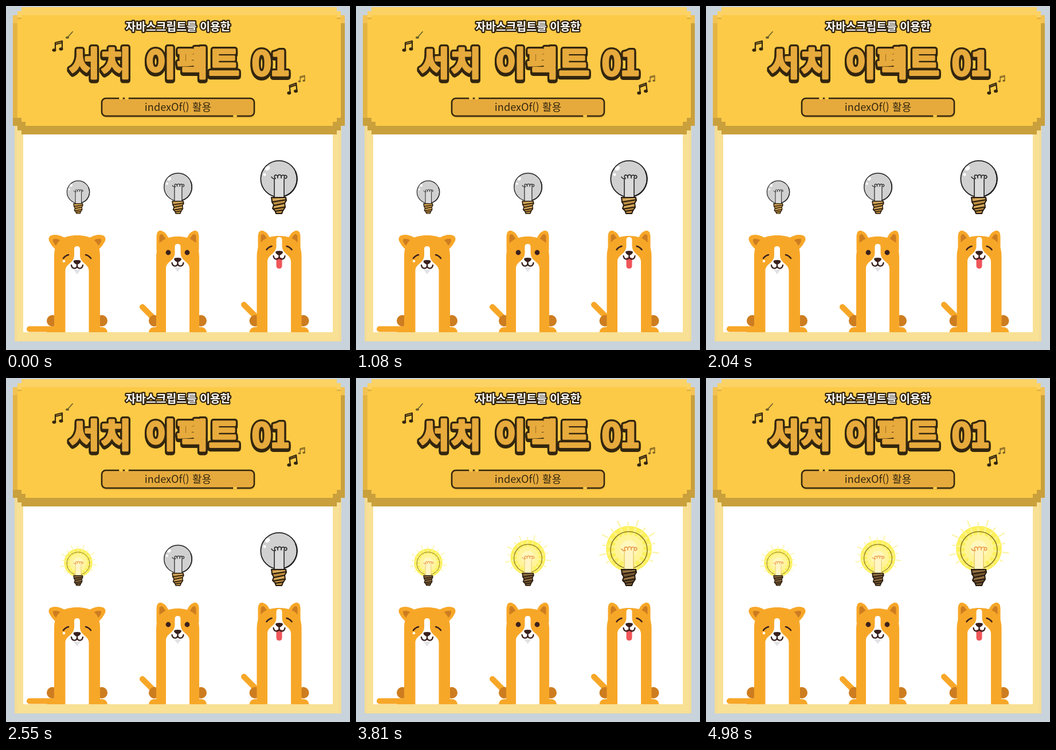
These frames come from a looping animation (600 by 600 pixels, 5.01 s). An HTML page:

```html
<!DOCTYPE html>
<html lang="ko">
<head>
<meta charset="utf-8">
<style>
html, body { margin: 0; width: 100%; height: 100%; overflow: hidden; background: #c9d3dc; }
svg { display: block; width: 600px; height: 600px; }
text { font-family: "Noto Sans CJK KR", "Noto Sans CJK", sans-serif; text-anchor: middle; paint-order: stroke; stroke-linejoin: round; }
.title { font-size: 58px; font-weight: 900; letter-spacing: 2px; }
</style>
</head>
<body>
<svg id="stage" viewBox="0 0 600 600"></svg>
<script>
const LOOP = 5010, STEP = 30;
const INK = '#33260f', ORANGE = '#f7a728', BROWN = '#cd7d20', FACE = '#3a211d';

const rect = (x, y, w, h, fill, more = '') =>
  `<rect x="${x}" y="${y}" width="${w}" height="${h}" fill="${fill}" ${more}/>`;
const path = (d, fill, more = '') => `<path d="${d}" fill="${fill}" ${more}/>`;
const line = (d, color, width, more = '') =>
  `<path d="${d}" fill="none" stroke="${color}" stroke-width="${width}" stroke-linecap="round" stroke-linejoin="round" ${more}/>`;
const circle = (x, y, r, fill, more = '') => `<circle cx="${x}" cy="${y}" r="${r}" fill="${fill}" ${more}/>`;
const group = (transform, body, more = '') => `<g transform="${transform}" ${more}>${body}</g>`;

function frame() {
  return rect(0, 0, 600, 600, '#c9d3dc') +
    rect(15, 200, 570, 385, '#f8e094') +
    rect(15, 200, 4, 385, '#f3dc98') + rect(581, 200, 4, 385, '#f3dc98') +
    rect(30, 222, 540, 347, '#fff') +
    path('M27 2H577V9H584V16H591V209H584V217H577V224H27V217H20V209H12V16H20V9H27Z', '#c9a03c') +
    path('M27 2H577V9H584V195H577V202H570V209H34V202H27V195H12V16H20V9H27Z', '#e4b443') +
    path('M27 2H577V9H584V20H12V16H20V9H27Z', '#fcd264') +
    path('M27 16H577V23H584V195H577V202H570V209H34V202H27V195H20V23H27Z', '#fdca47') +
    path('M584 16H591V30H584Z M12 16H20V30H12Z', '#f2c254');
}

function notes() {
  const pair = line('M-6 6V-6L6 -9V4M-6 -3L6 -6', INK, 2.2) +
    '<ellipse cx="-8" cy="7" rx="3.5" ry="2.7"/><ellipse cx="4" cy="5" rx="3.5" ry="2.7"/>';
  return group('translate(92 70)', pair, `fill="${INK}"`) +
    group('translate(501 144) rotate(-6)', pair, `fill="${INK}"`) +
    group('translate(517 127) scale(.65)', pair, `fill="${INK}" opacity=".65"`) +
    line('M108 54L116 45', '#6d6127', 1.8) +
    '<ellipse cx="107" cy="55" rx="3" ry="2" fill="#6d6127"/>';
}

function heading() {
  const words = (dy, color, width) =>
    `<g class="title" fill="${color}" stroke="${color}" stroke-width="${width}">` +
    `<text x="165" y="${121 + dy}">서치</text><text x="326" y="${121 + dy}">이펙트</text>` +
    `<text x="461" y="${121 + dy}" letter-spacing="-2">01</text></g>`;
  return `<text x="300" y="43" font-size="19.3" font-weight="700" fill="#fff" stroke="${INK}" stroke-width="4.5">자바스크립트를 이용한</text>` +
    words(3, INK, 10) + words(0, INK, 10) + words(0, '#e7aa3c', 3.5) +
    rect(167, 163, 267, 32, '#c99a36', 'rx="7" opacity=".5"') +
    rect(167, 161, 266, 31, '#e6aa3c', `rx="7" stroke="${INK}" stroke-width="2.6"`) +
    line('M199 161H202M209 161H212M398 192H401', '#fdca47', 4) +
    `<text x="300" y="183" font-size="18.2" font-weight="500" fill="${INK}">indexOf() 활용</text>`;
}

// Dog coordinates: x from the middle of the body, y from the nose.
function dog(x, noseY, { half, top, ears, eyes, tail, extra = '' }) {
  const floor = 569 - noseY, crown = top - noseY;
  const mirror = s => s + group('scale(-1 1)', s);
  const leg = circle(-half - 3, floor - 20, 10, BROWN) +
    path(`M${-half - 13} ${floor}Q${-half - 12} ${floor - 9} ${-half - 2} ${floor - 9}H${-half + 8}V${floor}Z`, ORANGE);
  const body = path(`M${-half} ${floor}V${crown + 36}C${-half} ${crown + 8} ${-half + 17} ${crown} 0 ${crown}` +
    `S${half} ${crown + 8} ${half} ${crown + 36}V${floor}Z`, ORANGE);
  const chest = path(`M-20.5 ${floor}V15C-20.5 2 -6 3 -5 -12V-23Q-5 -28 0 -28Q5 -28 5 -23V-12C6 3 20.5 2 20.5 15V${floor}Z`, '#fff');
  const muzzle = path('M-6.5 -2Q-6 -4 0 -4T6.5 -2Q6 2 0 4Q-6 2 -6.5 -2Z', FACE) +
    line('M0 3V6M-10 5Q-9 11 -4 10.5Q0 10 0 5Q0 10 4 10.5Q9 11 10 5', FACE, 2.3);
  return line(tail, ORANGE, 10) +
    group(`translate(${x} ${noseY})`,
      mirror(leg) + mirror(ears) + body + chest + path('M-6 13H6L0 21Z', '#e2e2e6') +
      extra + muzzle + mirror(eyes));
}

function dogs() {
  const upright = top =>
    path(`M-37 ${top + 35}V${top + 9}Q-36 ${top - 2} -28 ${top}Q-18 ${top + 4} -15 ${top + 17}Z`, ORANGE) +
    path(`M-32 ${top + 21}V${top + 9}Q-30 ${top + 4} -26 ${top + 7}L-21 ${top + 14}Z`, BROWN);
  const floppy = path('M-22 -43Q-37 -51 -47 -46Q-52 -41 -47 -34Q-41 -22 -30 -20Z', ORANGE) +
    path('M-28 -38Q-37 -43 -42 -40Q-43 -35 -36 -28Z', BROWN);
  const asleep = line('M-24 -7Q-20 -12 -15 -13', FACE, 2.6);
  return dog(124, 447, {
    half: 40, top: 400, ears: floppy, eyes: asleep, tail: 'M41 563.5H84',
    extra: circle(-23, -2, 2.3, '#fff')
  }) + dog(299.5, 443, {
    half: 37.5, top: 402, ears: upright(-51), eyes: circle(-16.5, -13, 4.4, FACE), tail: 'M238 525L257 544'
  }) + dog(476.5, 431, {
    half: 39, top: 401, ears: upright(-39), eyes: line('M-22 -6Q-18 -11 -13 -12', FACE, 2.6), tail: 'M415 521L435 541',
    extra: path('M-5 8H5V22Q5 27 0 27T-5 22Z', '#ef5659')
  });
}

// Bulb coordinates: origin at the tip of the screw base.
function screwBase(fill, shine) {
  return path('M-13 -28H12L13 -23L10 -18L11 -11L7 -5L5 0H-5L-7 -5L-11 -9L-9 -15L-12 -20Z', fill, 'stroke="#25190d" stroke-width="2"') +
    line('M-10 -24L10 -26M-8 -11L9 -15', shine, 1.4) +
    line('M-12 -20L12 -24M-9 -14L10 -18M-10 -8L9 -11M-6 -4L7 -6', '#25190d', 2);
}
const FILAMENT = 'M-13 -64Q-11 -60 -6 -61C-12 -68 -1 -70 -2 -62C-4 -69 6 -70 4 -62C3 -69 12 -69 9 -62Q13 -60 14 -64Q13 -68 9 -66';

function darkBulb() {
  return circle(0, -60.5, 31.7, '#d0d0d1', 'stroke="#202020" stroke-width="1.8"') +
    line('M9 -30A31.7 31.7 0 0 0 29 -73', '#202020', 2.2) +
    path('M-8 -60V-28H9V-60', '#dadada') +
    line('M-8 -60V-29M9 -60V-29', '#252525', 1.6) + line(FILAMENT, '#252525', 1.6) +
    '<ellipse cx="-20" cy="-79" rx="4.5" ry="3.5" fill="#fff" transform="rotate(-40 -20 -79)"/>' +
    circle(-25, -68, 2.5, '#fff') + screwBase('#bd8e42', '#e5bd70');
}

function litBulb() {
  let rays = '', facets = '';
  for (let i = 0; i < 18; i++) {
    const a = (i * 20 + 8) * Math.PI / 180, c = Math.cos(a), s = Math.sin(a);
    const ray = (from, to) => `M${c * from} ${-64 + s * from}L${c * to} ${-64 + s * to}`;
    if (s < .72) rays += ray(42, i % 2 ? 46 : 52);
    facets += ray(22, 36);
  }
  return line(rays, '#fcf4a9', 2.4) + circle(0, -64, 40, '#fcf05c') +
    line(facets, '#fff48a', 4) +
    circle(0, -64, 25, '#fff49a') + circle(0, -64, 15, '#fff8bd') +
    circle(0, -62, 32, 'none', 'stroke="#8d7827" stroke-width="1.6"') +
    path('M-8 -60V-28H8V-60', '#fff5c4') +
    line('M-8 -60V-29M8 -60V-29', '#e6c45b', 1.3) + line(FILAMENT, '#ed9a4a', 1.7) +
    screwBase('#765833', '#a5834f');
}

// Each bulb blinks at its own pace, so the larger two slowly fall behind.
const bulbs = [
  { x: 126, scale: .62, blink: 510 },
  { x: 300, scale: .765, blink: 516 },
  { x: 476, scale: 1, blink: 516 }
];

const stage = document.getElementById('stage');
stage.innerHTML = frame() + notes() + heading() + dogs() +
  bulbs.map(({ x, scale }) => group(`translate(${x} 362) scale(${scale})`,
    `<g class="dark">${darkBulb()}</g><g class="lit">${litBulb()}</g>`)).join('');
const darkLayers = stage.querySelectorAll('.dark');
const litLayers = stage.querySelectorAll('.lit');

// Blinks land on whole animation steps.
function isLit(time, blink) {
  const stepEnd = (Math.floor(time / STEP) + 1) * STEP - 1;
  return Math.floor(stepEnd / blink) % 2 === 1;
}

const start = performance.now();
function draw() {
  const time = (performance.now() - start) % LOOP;
  bulbs.forEach(({ blink }, i) => {
    const lit = isLit(time, blink);
    litLayers[i].style.display = lit ? '' : 'none';
    darkLayers[i].style.display = lit ? 'none' : '';
  });
  requestAnimationFrame(draw);
}
draw();
</script>
</body>
</html>
```
